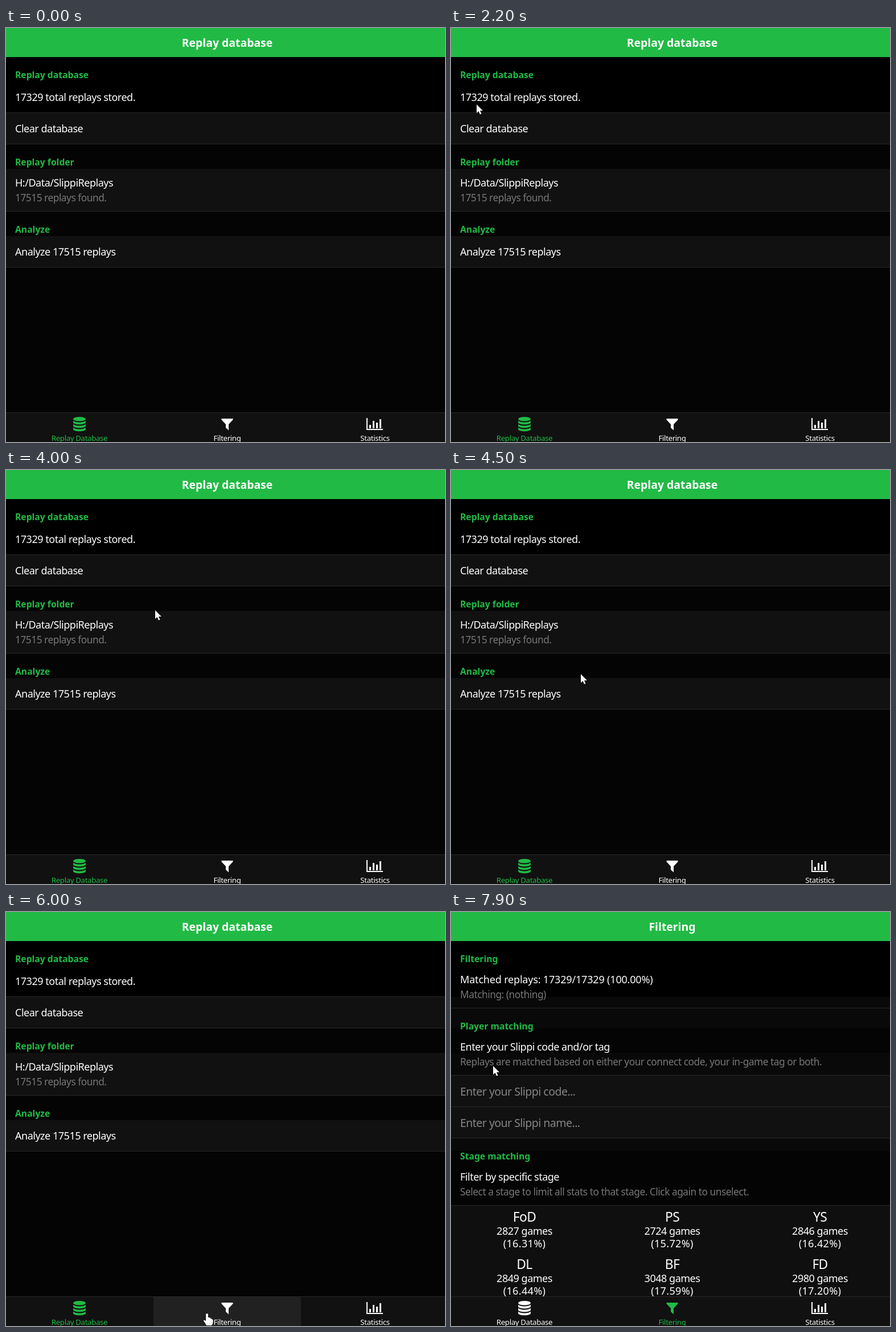
An HTML page for the animation above (8000 ms loop, 771x726 px).

```html
<!DOCTYPE html>
<html lang="en">
<head>
<meta charset="utf-8">
<title>Replay database</title>
<style>
  html, body { margin: 0; width: 100%; height: 100%; overflow: hidden; background: #040404; }
  svg { display: block; width: 771px; height: 726px; }
  text { font: 18px "Noto Sans", "Open Sans", sans-serif; letter-spacing: -.027em; fill: #fff; }
  .title { font-size: 19.4px; font-weight: 700; letter-spacing: 0; }
  .section { font-size: 15.7px; font-weight: 700; letter-spacing: 0; fill: #21ba45; }
  .note { font-size: 17.3px; fill: #777; }
  .field { font-size: 19.5px; fill: #858585; }
  .stage { font-size: 22.8px; }
  .ratio { letter-spacing: -.01em; }
  .share { letter-spacing: .02em; }
  .label { font-size: 13.25px; }
  .mid { text-anchor: middle; }
  .tab, .tab text { fill: #fff; }
  .tab.on, .tab.on text { fill: #21ba45; }
  #arrow, #hand { fill: #fff; stroke: #000; paint-order: stroke; }
</style>
</head>
<body>
<svg id="stage" viewBox="0 0 771 726"></svg>
<script>
const LOOP = 8000, STEP = 100, SWITCH = 6800;
const WIDTH = 771, HEADER = 51, NAV = 674, COLUMN = 259, TOTAL = 17329;
const ROW = '#111', GREEN = '#21ba45';

const rect = (x, y, w, h, fill, extra = '') =>
  `<rect x="${x}" y="${y}" width="${w}" height="${h}" fill="${fill}" ${extra}/>`;
const text = (x, y, str, cls = '') => `<text x="${x}" y="${y}" class="${cls}">${str}</text>`;
const rule = y => rect(0, y, WIDTH, 1, '#282828');
const columnMid = i => 129 + 259.5 * i;

// Areas that light up under the pointer
const hotspots = [];
function hotspot(x, y, w, h, fill, until = LOOP) {
  hotspots.push({ x, y, w, h, until });
  return rect(x, y, w, h, fill, 'class="glow" opacity="0"');
}

// Stacks section labels and rows below the header
function list(title, items) {
  let y = HEADER, svg = text(388.5, 33, title, 'title mid');
  for (const { section, line, note, field, button, cls } of items) {
    if (section) {
      svg += text(16, y + 37, section, 'section');
      y += 43;
      continue;
    }
    const height = note ? 74 : 54;
    if (button || field) svg += rect(0, y, WIDTH, height, ROW);
    if (button) svg += hotspot(0, y, WIDTH, height, '#1b1b1b', SWITCH);
    if (field) svg += text(16, y + 35, field, 'field');
    if (line) svg += text(16, y + (note ? 31 : 34), line, cls);
    if (note) svg += text(16, y + 57, note, 'note');
    y += height;
    svg += rule(y++);
  }
  return svg;
}

const database = list('Replay database', [
  { section: 'Replay database' },
  { line: TOTAL + ' total replays stored.' },
  { line: 'Clear database', button: true },
  { section: 'Replay folder' },
  { line: 'H:/Data/SlippiReplays', note: '17515 replays found.', button: true },
  { section: 'Analyze' },
  { line: 'Analyze 17515 replays', button: true }
]);

const games = { FoD: 2827, PS: 2724, YS: 2846, DL: 2849, BF: 3048, FD: 2980 };
const stages = Object.entries(games).map(([name, count], i) => {
  const x = columnMid(i % 3), y = 543 + 83 * Math.floor(i / 3);
  return text(x, y, name, 'stage mid') + text(x, y + 23, count + ' games', 'mid') +
    text(x, y + 45, `(${(100 * count / TOTAL).toFixed(2)}%)`, 'share mid');
}).join('');

// The previous rows stay faintly visible behind the second screen
const traces = hotspots.map(s => rect(s.x, s.y, s.w, s.h, '#090909')).join('');
const filtering = traces + list('Filtering', [
  { section: 'Filtering' },
  { line: `Matched replays: ${TOTAL}/${TOTAL} (100.00%)`, note: 'Matching: (nothing)', cls: 'ratio' },
  { section: 'Player matching' },
  { line: 'Enter your Slippi code and/or tag',
    note: 'Replays are matched based on either your connect code, your in-game tag or both.' },
  { field: 'Enter your Slippi code...' },
  { field: 'Enter your Slippi name...' },
  { section: 'Stage matching' },
  { line: 'Filter by specific stage',
    note: 'Select a stage to limit all stats to that stage. Click again to unselect.' }
]) + rect(0, 515, WIDTH, NAV - 515, '#0f0f0f') + stages;

// Icons are centred on x = 0
const disks = [0, 1, 2].map(i => `<path d="M-11 ${688.5 + 6 * i}c3 4 19 4 22 0v3c0 5-22 5-22 0z"/>`);
const bars = [6, 13, 10, 16].map((h, i) => rect(-10 + 6 * i, 702 - h, 3, h, 'inherit'));
const tabs = {
  'Replay Database': '<ellipse cy="685.8" rx="11" ry="3.8"/>' + disks.join(''),
  'Filtering': '<path d="M-10 685h20v2l-7.5 8v10.5l-5-4.5v-6l-7.5-8z"/>',
  'Statistics': '<path d="M-15 684h2v19h27v2h-29z"/>' + bars.join('').replaceAll('fill="inherit"', '')
};
const nav = rect(0, NAV, WIDTH, 52, ROW) + rule(NAV) +
  Object.entries(tabs).map(([name, icon], i) =>
    hotspot(COLUMN * i, NAV + 1, COLUMN, 51, '#212121') +
    `<g class="tab" transform="translate(${columnMid(i)})">${icon}${text(0, 724, name, 'label mid')}</g>`
  ).join('');

const stage = document.getElementById('stage');
stage.innerHTML = `
  ${rect(0, HEADER, WIDTH, 97, '#000')}
  ${rect(0, 0, WIDTH, HEADER, GREEN)}
  <g id="database">${database}</g>
  <g id="filtering">${filtering}</g>
  ${nav}
  <path id="arrow" d="M0 0V15L3.5 12 6 17.5 8.500 16.500 6 11H11Z"/>
  <path id="hand" d="M-2 2Q-2 0 0 0T2 2V7Q5 6 5.500 8.500Q8 7.500 8 10Q10.500 9.500 10.500 12V16Q10 19 8 21H-1Q-3 17-6 13Q-6 10-2 13Z"/>`;

// Each gesture visits its points at an even pace; the pointer rests in between
const entry = [880, 130];
const gestures = [
  { from: 500, to: 900, points: [[620, 64], [378, 85]] },
  { from: 1200, to: 2100, points: [[285, 106], [112, 201], [45, 134]] },
  { from: 2300, to: 3100, points: [[18, 112], [90, 99]] },
  { from: 3200, to: 3300, points: [[111, 110]] },
  { from: 3600, to: 4200, points: [[227, 218], [262, 246], [262, 298]] },
  { from: 4300, to: 4900, points: [[228, 358], [198, 455], [210, 403]] },
  { from: 5000, to: 5400, points: [[226, 424], [242, 560]] },
  { from: 5700, to: 6000, points: [[353, 704]] },
  { from: 6300, to: 6500, points: [[402, 706]] },
  { from: 7100, to: 7900, points: [[10, 660], [74, 270]] }
];

function pointer(t) {
  t = Math.floor(t / STEP) * STEP;
  let position = entry;
  for (const { from, to, points } of gestures) {
    if (t < from) break;
    const route = [position, ...points];
    const progress = Math.min(1, (t - from) / (to - from)) * points.length;
    const leg = Math.min(Math.floor(progress), points.length - 1);
    position = route[leg].map((a, axis) => Math.round(a + (route[leg + 1][axis] - a) * (progress - leg)));
  }
  return position;
}

function isOver({ x, y, w, h, until }, t) {
  const [px, py] = pointer(t);
  return t < until && px >= x && px < x + w && py >= y && py < y + h;
}

const byId = id => document.getElementById(id);
const show = (id, on) => byId(id).style.display = on ? '' : 'none';
const glows = stage.querySelectorAll('.glow'), tabEls = stage.querySelectorAll('.tab');

function draw(now) {
  const t = now % LOOP, filter = t >= SWITCH;
  show('database', !filter);
  show('filtering', filter);
  tabEls.forEach((el, i) => el.classList.toggle('on', i === +filter));
  hotspots.forEach((spot, i) =>
    glows[i].setAttribute('opacity', isOver(spot, t) ? 1 : isOver(spot, t - STEP) ? .5 : 0));
  const clickable = hotspots.some(spot => isOver(spot, t));
  show('arrow', !clickable);
  show('hand', clickable);
  for (const id of ['arrow', 'hand']) byId(id).setAttribute('transform', `translate(${pointer(t)})`);
  requestAnimationFrame(draw);
}
requestAnimationFrame(draw);
</script>
</body>
</html>
```
